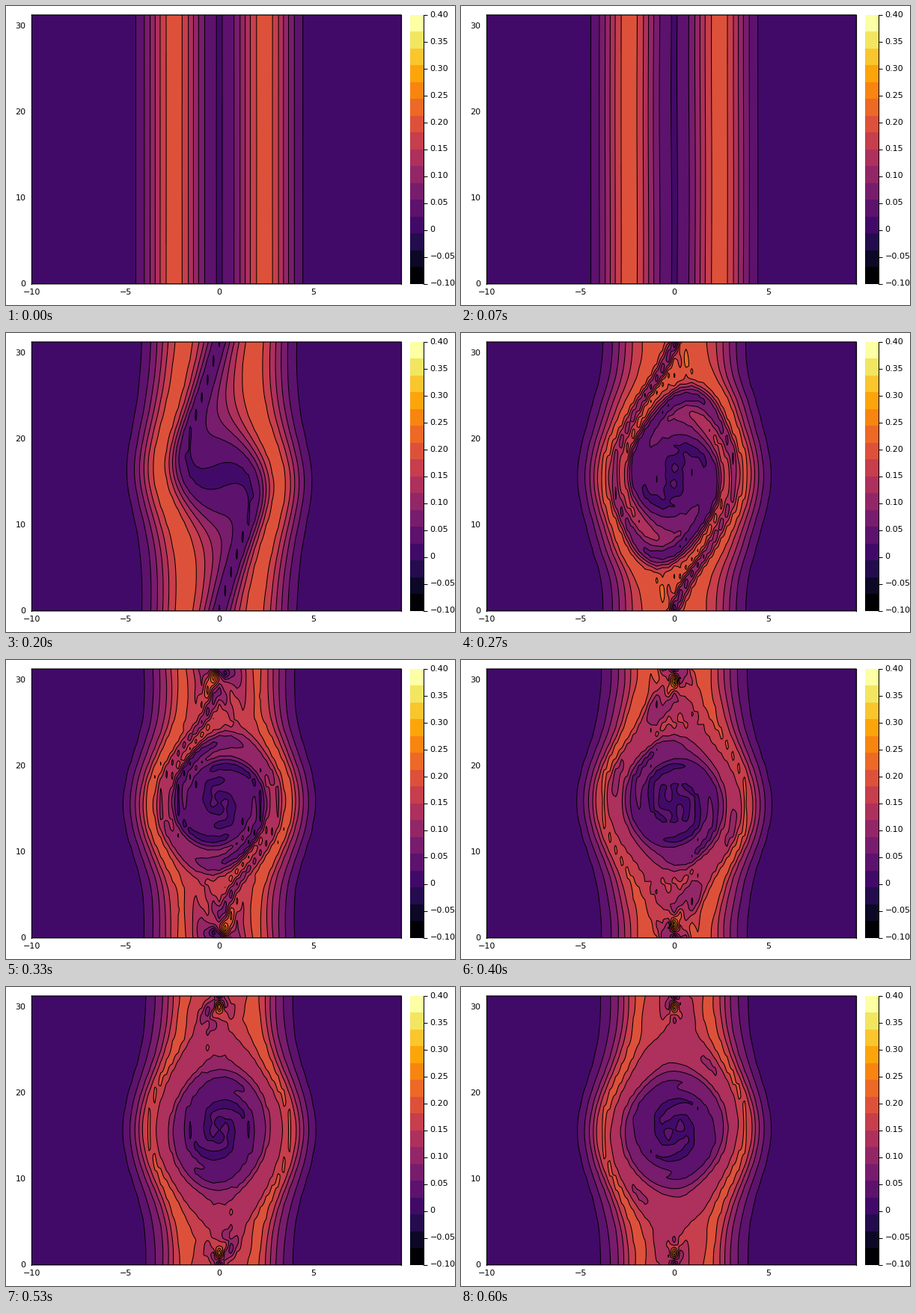
Recreate the animation shown at these times as a matplotlib script. Size 600 px wide and 400 px high, loop 670 ms.

```python
"""Two-stream instability: semi-Lagrangian Vlasov-Poisson solver, phase-space contours."""
from math import comb, factorial

import numpy as np
import matplotlib.pyplot as plt
from matplotlib.animation import FuncAnimation

W, H, DPI = 600, 400, 100
SNAPSHOTS, LOOP_MS, TICK_MS = 10, 670, 10

# Phase-space grid (periodic in both directions)
NX, NV = 256, 64
K, V0, EPS = 0.2, 2.4, 1e-3
LENGTH, VMAX = 2 * np.pi / K, 10.0
DX, DV = LENGTH / NX, 2 * VMAX / NV
x = np.arange(NX) * DX
v = -VMAX + np.arange(NV) * DV
DT, STEPS = 0.1, 100  # time step, steps per snapshot
P = 5                 # spline degree (odd)


def bspline(u):
    """Cardinal B-spline of degree P, centred on zero."""
    u = (P + 1) / 2 - np.abs(u)
    return sum((-1)**j * comb(P + 1, j) * np.clip(u - j, 0, None)**P
               for j in range(P // 2 + 1)) / factorial(P)


def shift_symbol(cells, n):
    """Fourier symbol of a spline-interpolated shift, one row per displacement."""
    theta = 2 * np.pi * np.arange(n // 2 + 1) / n
    whole = np.floor(cells)
    part = cells - whole
    reach = np.arange(-(P // 2), P // 2 + 2)
    waves = np.exp(-1j * np.outer(reach, theta))
    rows = bspline(reach - part[:, None]) @ waves
    return rows * np.exp(-1j * whole[:, None] * theta) / (bspline(reach) @ waves).real


def advect(f, symbol):
    """Shift every row of f."""
    return np.fft.irfft(np.fft.rfft(f, axis=1) * symbol, f.shape[1], axis=1)


def field(f):
    """Electric field from dE/dx = rho - <rho>."""
    rho = np.fft.rfft(f.sum(axis=1) * DV)
    rho[0] = 0
    modes = K * np.arange(rho.size)
    modes[0] = 1
    return np.fft.irfft(rho / (1j * modes), NX)


def simulate():
    beams = np.exp(-(v - V0)**2 / 2) + np.exp(-(v + V0)**2 / 2)
    f = np.outer(1 + EPS * np.cos(K * x), beams) / (2 * np.sqrt(2 * np.pi))
    half = shift_symbol(v * DT / 2 / DX, NX)
    states = [f]
    for _ in range(SNAPSHOTS - 1):
        for _ in range(STEPS):
            f = advect(f.T, half).T
            f = advect(f, shift_symbol(field(f) * DT / DV, NV))
            f = advect(f.T, half).T
        states.append(f)
    return states


def pixel_axes(left, top, right, bottom):
    return fig.add_axes([left / W, 1 - bottom / H, (right - left) / W, (bottom - top) / H])


def label(px, py, text, ha):
    fig.text(px / W, 1 - py / H, text.replace("-", "\u2212"), ha=ha, va="center",
             fontsize=8, family="DejaVu Sans")


LOW, HIGH, BANDS = -0.1, 0.4, 16
levels = np.linspace(LOW, HIGH, BANDS + 1)
colors = plt.get_cmap("inferno")(np.linspace(0, 1, BANDS))

LEFT, TOP, RIGHT, BOTTOM = 34.3, 12, 528, 371.8
fig = plt.figure(figsize=(W / DPI, H / DPI), dpi=DPI, facecolor="white")
ax = pixel_axes(LEFT, TOP, RIGHT, BOTTOM)
ax.set(xlim=(v[0], v[-1]), ylim=(x[0], x[-1]), xticks=[], yticks=[])
for side, spine in ax.spines.items():
    spine.set(linewidth=0.9, zorder=5, snap=side in ("left", "right"))

for t in (-10, -5, 0, 5):
    label(LEFT + (t - v[0]) / (v[-1] - v[0]) * (RIGHT - LEFT), 383, str(t), "center")
for t in (0, 10, 20, 30):
    label(26.5, BOTTOM + 0.6 - t / x[-1] * (BOTTOM - TOP), str(t), "right")

# Colour bar
bar = pixel_axes(540, TOP, 558, BOTTOM)
bar.bar(np.zeros(BANDS), np.diff(levels), 2, levels[:-1], color=colors, antialiased=False)
bar.set(xlim=(-1, 1), ylim=(LOW, HIGH), xticks=[])
ticks = np.arange(-2, 9) * 0.05
bar.yaxis.tick_right()
bar.set_yticks(ticks, [])
bar.tick_params(length=3.4, width=0.75)
for side in ("left", "top", "bottom"):
    bar.spines[side].set_visible(False)
bar.spines["right"].set_linewidth(0.75)
for i, t in enumerate(ticks):
    label(566.5, BOTTOM - 0.4 - (t - LOW) / (HIGH - LOW) * (BOTTOM - TOP),
          "0" if i == 2 else f"{t:.2f}", "left")


def contours(f):
    f = np.clip(f, LOW + 1e-6, HIGH - 1e-6)
    return (ax.contourf(v, x, f, levels, colors=colors, zorder=1),
            ax.contour(v, x, f, levels, colors="black", linewidths=0.75,
                       linestyles="solid", zorder=2))


layers = [contours(f) for f in simulate()]
TICKS = LOOP_MS // TICK_MS


def draw(i):
    """Show the snapshot due at tick i (15 snapshots per second)."""
    current = int((i + 0.5) * TICK_MS * 15 / 1000)
    for n, layer in enumerate(layers):
        for artist in layer:
            artist.set_visible(n == current)
    return layers[current]


anim = FuncAnimation(fig, draw, frames=TICKS, init_func=lambda: draw(0),
                     interval=TICK_MS, repeat=True, repeat_delay=0, blit=False)
plt.show()
```
